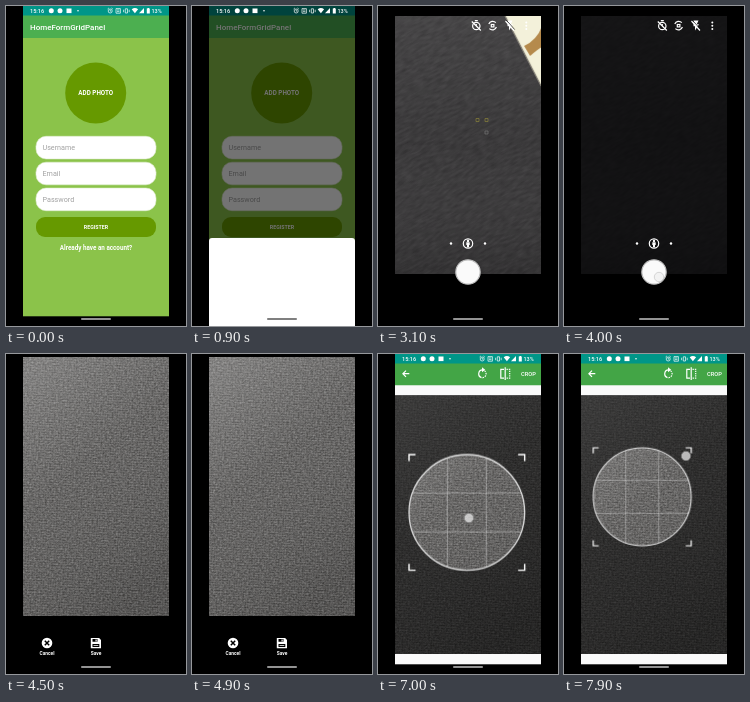
Recreate the animation shown at these times as an HTML page. Size 180x320 px, loop 8000 ms.

```html
<!DOCTYPE html>
<html lang="en">
<head>
<meta charset="utf-8">
<title>Profile photo flow</title>
<style>
html, body { margin: 0; width: 100%; height: 100%; overflow: hidden; background: #000; }
svg { display: block; width: 100vw; height: 100vh; }
text { font-family: Roboto, sans-serif; fill: #fff; }
.bold { font-weight: 700; }
.mid { text-anchor: middle; }
.hint { font-size: 7.2px; fill: #a2a2a2; }
.line { fill: none; stroke: #fff; stroke-width: 1.2; }
.thin { fill: none; stroke: #fff; stroke-width: .7; }
.white { fill: #fff; }

.anim { animation: 8s linear infinite both; }
#scrim { animation-name: scrim; }
#sheet { animation-name: sheet; animation-timing-function: ease-out; }
#camera { animation-name: camera; transform-origin: 90px 160px; }
#backing { animation-name: backing; }
#preview { animation-name: preview; }
#drift { animation-name: drift; }
#corner { animation-name: corner; }
#dark { animation-name: dark; }
#focus { animation-name: focus; }
#review { animation-name: review; }
#crop { animation-name: crop; }
#loaded { animation-name: loaded; }
#frame { animation-name: frame; }
#spinner { animation-name: spin; animation-duration: .8s; transform-origin: 90px 170px; }
#status { animation-name: status; }
#pill { animation-name: pill; }
#touch { animation-name: touch; }

@keyframes scrim { 0%, 4% { opacity: 0 } 9%, 100% { opacity: .55 } }
@keyframes sheet { 0%, 5% { transform: translateY(90px) } 11%, 100% { transform: none } }
@keyframes backing { 0%, 26.2% { opacity: 0 } 26.25%, 100% { opacity: 1 } }
@keyframes camera {
  0%, 23.5% { opacity: 0; transform: scale(.88) }
  26.25% { opacity: 1; transform: scale(.975) }
  27.5% { transform: scale(.988) }
  28.75%, 100% { opacity: 1; transform: none }
}
@keyframes preview { 0%, 30% { opacity: 0 } 33%, 100% { opacity: 1 } }
@keyframes drift {
  0%, 30% { transform: translate(-24px, 20px) }
  38.75% { transform: none }
  51%, 100% { transform: translate(20px, -14px) }
}
@keyframes corner {
  0%, 30% { transform: translate(-22px, 18px) }
  38.75% { transform: none }
  43%, 100% { transform: translate(40px, -34px) }
}
@keyframes dark { 0%, 39.5% { opacity: 0 } 48%, 100% { opacity: .75 } }
@keyframes focus { 0%, 36% { opacity: 0 } 36.1%, 41% { opacity: 1 } 41.1%, 100% { opacity: 0 } }
@keyframes review { 0%, 56.2% { opacity: 0 } 56.25%, 100% { opacity: 1 } }
@keyframes crop { 0%, 75% { opacity: 0; transform: translateY(8px) } 77.5%, 100% { opacity: 1; transform: none } }
@keyframes loaded { 0%, 82.4% { opacity: 0 } 82.5%, 100% { opacity: 1 } }
@keyframes frame {
  0%, 85% { transform: translate(90px, 170.5px) scale(1.18) }
  92.5%, 95.5% { transform: translate(86.5px, 134.5px) scale(1.18) }
  98.75%, 100% { transform: translate(78.2px, 142.8px) scale(1) }
}
@keyframes spin { from { transform: rotate(-40deg) } to { transform: rotate(320deg) } }
@keyframes status { 0%, 28.7% { opacity: 1 } 28.75%, 75.5% { opacity: 0 } 76.5%, 100% { opacity: 1 } }
@keyframes pill { 0%, 6% { fill: #c4c4c4 } 10%, 28% { fill: #555 } 30%, 100% { fill: #c4c4c4 } }
@keyframes touch {
  0%, 1% { opacity: 0; transform: translate(92px, 94px) }
  1.25%, 3.5% { opacity: .75; transform: translate(92px, 94px) }
  5% { opacity: 0; transform: translate(92px, 94px) }
  5.1%, 20% { opacity: 0; transform: translate(38.5px, 280px) }
  21.25%, 25% { opacity: .75; transform: translate(38.5px, 280px) }
  27.5% { opacity: .38; transform: translate(38.5px, 280px) }
  28.75% { opacity: 0; transform: translate(38.5px, 280px) }
  28.8%, 48.5% { opacity: 0; transform: translate(95px, 271px) }
  50%, 52% { opacity: .4; transform: translate(95px, 271px) }
  53% { opacity: 0; transform: translate(95px, 271px) }
  53.1%, 73% { opacity: 0; transform: translate(91px, 291px) }
  73.75%, 75% { opacity: .75; transform: translate(91px, 291px) }
  76.5% { opacity: 0; transform: translate(91px, 291px) }
  76.6%, 84% { opacity: 0; transform: translate(92px, 176px) }
  85% { opacity: .75; transform: translate(92px, 176px) }
  92.5% { opacity: .75; transform: translate(88.5px, 140px) }
  93.7% { opacity: 0; transform: translate(88.5px, 140px) }
  93.8%, 95% { opacity: 0; transform: translate(139px, 85px) }
  95.5% { opacity: .75; transform: translate(139px, 85px) }
  98.75%, 100% { opacity: .75; transform: translate(122px, 102px) }
}
</style>
</head>
<body>
<svg viewBox="0 0 180 320">
  <defs>
    <filter id="knit" x="0" y="0" width="100%" height="100%" color-interpolation-filters="sRGB">
      <feTurbulence type="fractalNoise" baseFrequency=".45 .6" numOctaves="2" seed="4"/>
      <feColorMatrix values=".34 0 0 0 .235  .34 0 0 0 .23  .34 0 0 0 .225  0 0 0 0 1"/>
    </filter>
    <filter id="blurred" x="0" y="0" width="100%" height="100%" color-interpolation-filters="sRGB">
      <feTurbulence type="fractalNoise" baseFrequency=".11 .4" numOctaves="2" seed="9"/>
      <feColorMatrix values=".1 0 0 0 .175  .1 0 0 0 .17  .1 0 0 0 .175  0 0 0 0 1"/>
    </filter>
    <pattern id="stitches" width="2.4" height="2.6" patternUnits="userSpaceOnUse" patternTransform="rotate(3)">
      <ellipse cx="1.2" cy="1.3" rx=".9" ry=".55" opacity=".25"/>
    </pattern>
    <linearGradient id="light" x1=".15" y1="0" x2=".6" y2="1">
      <stop offset="0" stop-color="#fff" stop-opacity=".22"/>
      <stop offset=".45" stop-color="#fff" stop-opacity=".05"/>
      <stop offset="1" stop-opacity=".1"/>
    </linearGradient>
    <linearGradient id="falloff" x2="0" y2="1">
      <stop offset="0" stop-color="#fff" stop-opacity=".07"/>
      <stop offset=".5" stop-color="#fff" stop-opacity=".01"/>
      <stop offset="1" stop-opacity=".1"/>
    </linearGradient>
    <clipPath id="screen"><rect x="17" width="146" height="320"/></clipPath>
    <clipPath id="viewfinder"><rect x="17" y="10" width="146" height="258"/></clipPath>
    <clipPath id="picture"><rect x="17" y="41.5" width="146" height="258.5"/></clipPath>
    <g id="photo">
      <rect width="146" height="259" filter="url(#knit)"/>
      <rect width="146" height="259" fill="url(#stitches)"/>
      <rect width="146" height="259" fill="url(#light)"/>
    </g>
    <g id="bars">
      <rect x="17" width="146" height="9.5" fill="#009688"/>
      <rect x="17" y="310.3" width="146" height="10"/>
    </g>
  </defs>

  <rect width="180" height="320"/>
  <g clip-path="url(#screen)">

    <g id="form">
      <rect x="17" y="9" width="146" height="302" fill="#8bc34a"/>
      <rect x="17" y="9" width="146" height="23" fill="#4caf50"/>
      <use href="#bars"/>
      <text x="24" y="24" font-size="8" font-weight="500">HomeFormGridPanel</text>
      <circle cx="89.7" cy="87" r="30.5" fill="#669900"/>
      <text class="bold mid" x="89.7" y="89.3" font-size="6.3">ADD PHOTO</text>
      <g fill="#fff" stroke="#e3ecd6" stroke-width=".6">
        <rect x="30" y="130.3" width="120" height="22.6" rx="10"/>
        <rect x="30" y="156.2" width="120" height="22.6" rx="10"/>
        <rect x="30" y="182.1" width="120" height="22.6" rx="10"/>
      </g>
      <text class="hint" x="36.5" y="144.3">Username</text>
      <text class="hint" x="36.5" y="170.2">Email</text>
      <text class="hint" x="36.5" y="196.1">Password</text>
      <rect x="30" y="211" width="120" height="20" rx="9" fill="#669900"/>
      <text class="bold mid" x="90" y="223" font-size="5.3">REGISTER</text>
      <text class="bold mid" x="90" y="244.2" font-size="6.3">Already have an account?</text>
    </g>

    <rect id="scrim" class="anim" x="17" width="146" height="320"/>
    <rect id="backing" class="anim" x="17" y="25" width="146" height="210" fill="#999"/>
    <rect id="sheet" class="anim" x="17" y="232" width="146" height="100" rx="3" fill="#fff"/>

    <g id="camera" class="anim">
      <rect x="17" width="146" height="320"/>
      <g id="preview" class="anim" clip-path="url(#viewfinder)">
        <g id="drift" class="anim">
          <g transform="rotate(-28 90 140)">
            <rect x="-100" y="-60" width="380" height="400" filter="url(#blurred)"/>
          </g>
        </g>
        <rect x="17" y="10" width="146" height="258" fill="url(#falloff)"/>
        <g id="corner" class="anim">
          <path d="M127 10L163 80L230 80V-60H91z" fill="#f3f1da"/>
          <path d="M164 20Q159 34 146 40L152 50Q160 43 164 41z" fill="#b58a4c"/>
          <path d="M127 10L163 80" stroke="#8b877c" stroke-width="1.2"/>
        </g>
        <rect id="dark" class="anim" x="17" y="10" width="146" height="258" fill="#050506"/>
        <g id="focus" class="anim" fill="none" stroke-width=".7">
          <path d="M98 112.5h3v3h-3zM107 112.5h3v3h-3z" stroke="#8a833a"/>
          <path d="M107 125h3v3h-3z" stroke="#777"/>
        </g>
      </g>
      <path class="white" d="M129.5 14.5h5l-1.7 3.8h2.2l-4 6.2v-4.3h-1.5z"/>
      <path d="M128.3 14.2l8.4 9.4" stroke="#000" stroke-opacity=".75"/>
      <g class="line">
        <circle cx="98.3" cy="20" r="3.7"/>
        <path d="M93.8 15.5l9 9M96.8 14.7h3M98.3 18v2.3"/>
        <path d="M110.8 18a4.2 4.2 0 0 1 7-1.3M118.4 21a4.2 4.2 0 0 1-7 1.7"/>
        <rect x="113.3" y="18.5" width="2.6" height="2.4"/>
        <path d="M127.5 15l8.5 9.5"/>
        <circle cx="90" cy="237.5" r="4.7"/>
      </g>
      <path class="white" d="M88.3 236.2h3.4v2.8h-.7v2.2h-2v-2.2h-.7z"/>
      <g class="white">
        <circle cx="90" cy="234.9" r="1.2"/>
        <circle cx="148.3" cy="16.5" r="1"/><circle cx="148.3" cy="19.7" r="1"/><circle cx="148.3" cy="22.9" r="1"/>
        <circle cx="73" cy="237.5" r="1.2"/><circle cx="107" cy="237.5" r="1.2"/>
      </g>
      <circle cx="90" cy="266" r="12.2" fill="#fafafa" stroke="#bbb" stroke-width="1.2"/>
    </g>

    <g id="review" class="anim">
      <rect x="17" width="146" height="320"/>
      <use href="#photo" x="17" y="3"/>
      <circle class="white" cx="41" cy="289" r="5.3"/>
      <path d="M38.8 286.8l4.4 4.4M43.2 286.8l-4.4 4.4" stroke="#000" stroke-width="1.5"/>
      <path class="white" d="M84.8 284h8.3l1.9 2v8.3H84.8z"/>
      <path d="M86.5 285h5v2.8h-5zM86.5 290h6.8v3h-6.8z"/>
      <path class="white" d="M89.5 285.4h1.2v2h-1.2zM87.5 291h4.8v.8h-4.8z"/>
      <g class="bold mid" font-size="4.9">
        <text x="41" y="301.2">Cancel</text>
        <text x="90" y="301.2">Save</text>
      </g>
    </g>

    <g id="crop" class="anim">
      <rect x="17" y="9" width="146" height="302" fill="#fafafa"/>
      <rect x="17" y="9" width="146" height="22.5" fill="#43a546"/>
      <path class="line" d="M31.3 19.7h-6.2M28 16.6l-3.1 3.1 3.1 3.1"/>
      <path class="line" d="M104.5 15.8a4 4 0 0 0-1 7.8"/>
      <path class="line" d="M104.5 23.8a4 4 0 0 0 1.5-7.5" stroke-dasharray="1.6 1"/>
      <path class="white" d="M104 13.2l3.2 2.6-3.2 2.5z"/>
      <path class="line" d="M126 15.3h-3.2v8.8h3.2M127.2 13.3v12.6"/>
      <path class="line" d="M128.5 15.3h3.2v8.8h-3.2" stroke-dasharray="1.3 1"/>
      <text x="143" y="21.8" font-size="5.7" font-weight="500">CROP</text>
      <path id="spinner" class="anim" d="M95.6 165.8A7 7 0 0 1 97 170.5" fill="none" stroke="#a5a33c" stroke-width="1.3"/>
      <g id="loaded" class="anim">
        <rect x="17" y="31.5" width="146" height="279" fill="#fafafa"/>
        <g clip-path="url(#picture)">
          <use href="#photo" x="17" y="41.3"/>
          <g id="frame" class="anim">
            <circle r="249" fill="none" stroke="#000" stroke-opacity=".55" stroke-width="400"/>
            <path d="M-16.5-46.5v93M16.5-46.5v93M-46.5-16.5h93M-46.5 16.5h93" stroke="#ddd" stroke-opacity=".65" stroke-width=".6"/>
            <circle r="49" fill="none" stroke="#ddd" stroke-width="1.1"/>
            <path class="line" d="M-49-43.5V-49h5.5M43.5-49H49v5.5M49 43.5V49h-5.5M-43.5 49H-49v-5.5"/>
          </g>
        </g>
      </g>
      <use href="#bars"/>
    </g>

    <rect id="pill" class="anim" x="75" y="312.2" width="30" height="1.6" rx=".8"/>

    <g id="status" class="anim">
      <text x="24" y="7" font-size="5.6" font-weight="500">15:16</text>
      <g class="white">
        <circle cx="45.3" cy="4.8" r="2.5"/>
        <circle cx="54" cy="4.8" r="2.5"/>
        <rect x="60.5" y="2.5" width="5" height="4.6"/>
        <circle cx="72" cy="4.8" r=".8"/>
        <path d="M125.7 3.3q3.2-2.4 6.4 0l-3.2 4zM133 7.3h5v-5.2zM140.8 2.6h.8v-.7h1.4v.7h.8v4.8h-3z"/>
      </g>
      <g class="thin">
        <circle cx="104.2" cy="5" r="2"/>
        <path d="M104.2 3.7V5l1 .6M101.6 3l1.3-1M106.8 3l-1.3-1M110 2.6h4.4v4.6H110zM111 4h2.4M111 5.6h2.4M119.3 2.8h2.2v4.2h-2.2zM117.6 3.7v2.5M123.2 3.7v2.5"/>
      </g>
      <text x="145.4" y="7" font-size="5.5" font-weight="500">13%</text>
    </g>

    <circle id="touch" class="anim" r="4.7" fill="#e8e8e8" stroke="#888" stroke-width=".8"/>
  </g>
</svg>
</body>
</html>
```
